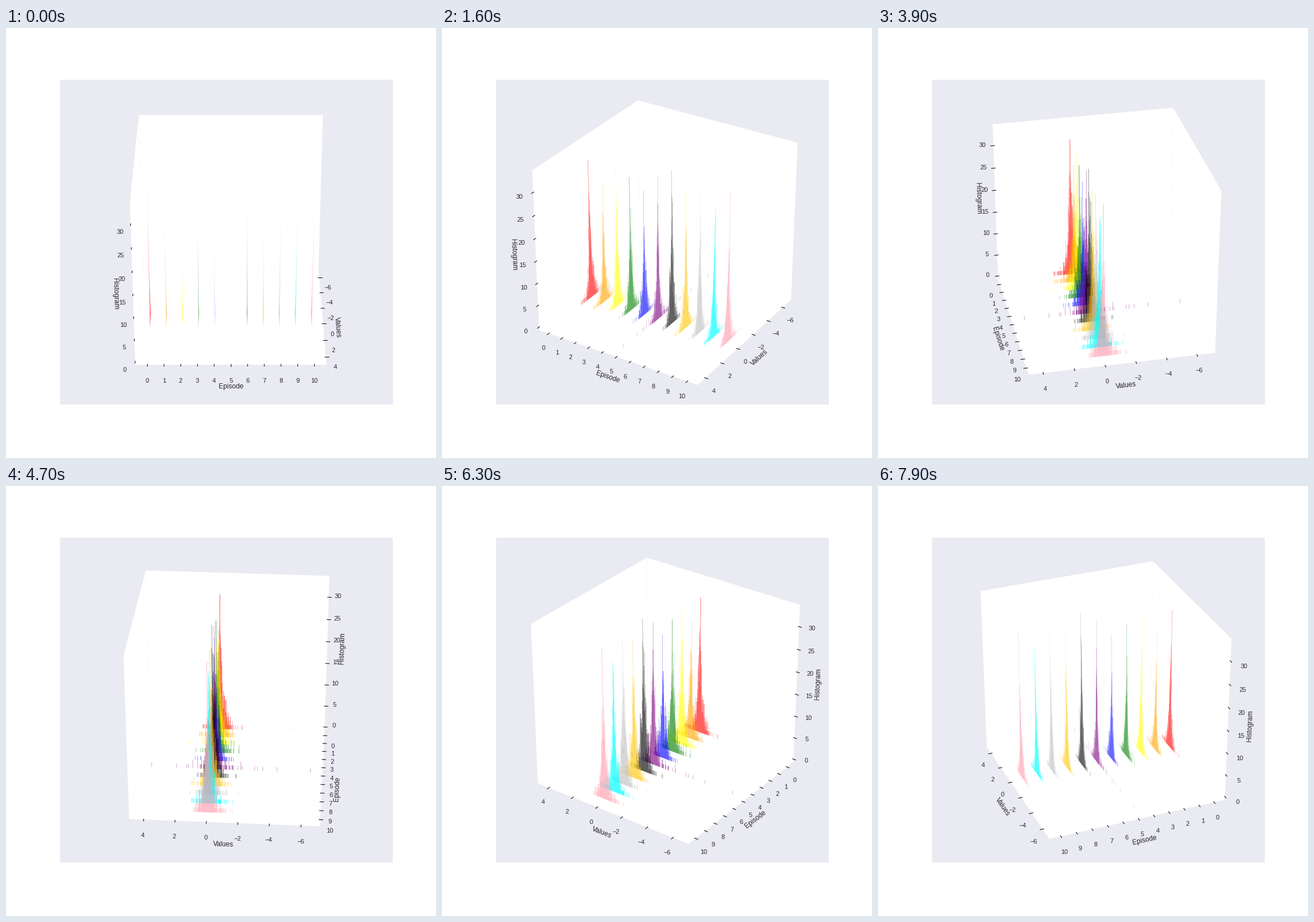
These frames come from a looping animation (748 px wide and 748 px high, 8 s). A matplotlib script:

```python
import numpy as np
import matplotlib.pyplot as plt
from matplotlib.animation import FuncAnimation
from matplotlib.collections import LineCollection, PolyCollection
from matplotlib.colors import to_rgba

SIZE, DPI = 748, 64
PT = 72 / DPI                      # points per pixel
FRAMES, INTERVAL, STEP = 80, 100, 2
ELEV, DIST = np.radians(30), 10
LOW = np.array([-6.95, -0.5, 0.0])
SPAN = np.array([11.635, 11.0, 34.0])
WALL = 0.5 + 1 / 48                # half width of the box
DELTA = 1 / 12
PER_POINT = 48 / (SIZE * (0.775 + 0.755)) * DELTA
TICK_PAD, LABEL_PAD = 15 * PER_POINT, 25 * PER_POINT
BINS = 700

plt.rcParams["font.family"] = "Liberation Sans"
INK = "#262626"

# name, index, axis to flip to the front, tick direction, tick values
AXES = [
    ("Values", 0, 1, 1, range(-6, 5, 2)),
    ("Episode", 1, 0, 0, range(11)),
    ("Histogram", 2, 0, 0, range(0, 31, 5)),
]

# colour, alpha, highest count, tail width
SERIES = [
    ("red", 0.85, 31, 0.65), ("orange", 0.85, 27, 0.75), ("yellow", 0.85, 31, 0.9),
    ("green", 0.85, 30, 0.95), ("blue", 0.85, 28, 0.75), ("purple", 0.85, 32, 1.5),
    ("black", 0.85, 34, 0.6), ("#ffc800", 0.85, 31, 0.65), ("silver", 0.85, 32, 0.65),
    ("cyan", 1.0, 29, 0.9), ("#ff9bac", 0.85, 33, 0.55),
]
OUTLIERS = [4.13, -2.9, -3.25, -4.2, -6.4]


def to_cube(points):
    return (np.asarray(points, float) - LOW) / SPAN - 0.5


def project(points, azim):
    """Perspective view of box coordinates as 2D plot coordinates."""
    ca, sa, ce, se = np.cos(azim), np.sin(azim), np.cos(ELEV), np.sin(ELEV)
    view = np.array([[-sa, ca, 0], [-se * ca, -se * sa, ce], [ce * ca, ce * sa, se]])
    p = np.asarray(points) @ view.T
    return p[..., :2] / (DIST - p[..., 2:])


def make_bars():
    rng = np.random.default_rng(7)
    edges = np.linspace(-6.42, 4.15, BINS + 1)
    width = edges[1] - edges[0]
    dist = np.abs(edges[:-1] + width / 2 + 0.04)
    bars, colors = [], []
    for ep, (color, alpha, peak, tail) in enumerate(SERIES):
        mean = 0.72 * peak * np.exp(-dist / 0.205) + 0.25 * np.exp(-(dist / tail) ** 2)
        counts = np.minimum(rng.poisson(mean), peak)
        counts[np.argmin(dist) + rng.integers(-3, 4)] = peak
        if color == "purple":
            counts[np.searchsorted(edges, OUTLIERS) - 1] = 1
        for x, n in zip(edges[:-1], counts):
            if n:
                bars.append([(x, ep, 0), (x, ep, n), (x + width, ep, n), (x + width, ep, 0)])
                colors.append(to_rgba(color, alpha))
    return to_cube(bars), colors


def pane(axis, back):
    """Corners of the wall at the far side along one axis."""
    a, b = [i for i in range(3) if i != axis]
    corners = np.empty((4, 3))
    corners[:, axis] = back[axis]
    corners[:, a] = np.array([-1, 1, 1, -1]) * WALL
    corners[:, b] = np.array([-1, -1, 1, 1]) * WALL
    return corners


def push_out(pos, axis, amount):
    moved = pos + np.where(pos < 0, -amount, amount)
    moved[axis] = pos[axis]
    return moved


fig = plt.figure(figsize=(SIZE / DPI, SIZE / DPI), dpi=DPI, facecolor="white")
ax = fig.add_axes([0.125, 0.125, 0.775, 0.755], facecolor="#eaeaf2")
ax.set(xlim=(-0.095, 0.09), ylim=(-0.095, 0.09), xticks=[], yticks=[])
ax.spines[:].set_visible(False)

bars, bar_colors = make_bars()
panes = PolyCollection([], facecolors="white", linewidths=0, zorder=1)
ticks = LineCollection([], colors="black", linewidths=1 * PT, zorder=2)
hist = PolyCollection([], facecolors=bar_colors, linewidths=0, zorder=4, snap=False)
for item in (panes, ticks, hist):
    ax.add_collection(item, autolim=False)

names, numbers = [], []
for name, _, _, _, values in AXES:
    names.append(ax.text(0, 0, name, size=12 * PT, color=INK, ha="center", va="center", zorder=3))
    numbers.append([
        ax.text(0, 0, str(v).replace("-", "\u2212"), size=11 * PT, color=INK,
                ha="center", va="top", zorder=3)
        for v in values
    ])


def draw(i):
    azim = np.radians(STEP * i)
    high = [np.cos(azim) < -1e-9, False, False]
    back = np.where(high, WALL, -WALL)
    panes.set_verts([project(pane(k, back), azim) for k in range(3)])
    hist.set_verts(project(bars, azim))

    lines = []
    for (_, axis, flip, tickdir, values), label, texts in zip(AXES, names, numbers):
        edge = back.copy()
        edge[flip] *= -1
        mid, end = edge.copy(), edge.copy()
        mid[axis] = 0
        end[axis] *= -1

        label.set_position(project(push_out(mid, axis, LABEL_PAD), azim))
        (x1, y1), (x2, y2) = ax.transData.transform(project([edge, end], azim))
        angle = np.degrees(np.arctan2(y2 - y1, x2 - x1)) % 180
        label.set_rotation(angle - 180 if angle > 90 else angle)

        sign = 1 if high[tickdir] else -1
        for value, text in zip(values, texts):
            pos = edge.copy()
            pos[axis] = (value - LOW[axis]) / SPAN[axis] - 0.5
            a, b = pos.copy(), pos.copy()
            a[tickdir] += 0.1 * sign * DELTA
            b[tickdir] -= 0.2 * sign * DELTA
            lines.append(project([a, b], azim))
            text.set_position(project(push_out(pos, axis, TICK_PAD), azim))
    ticks.set_segments(lines)
    return []


anim = FuncAnimation(fig, draw, frames=FRAMES, interval=INTERVAL, repeat=True,
                     repeat_delay=0, blit=False)
plt.show()
```
